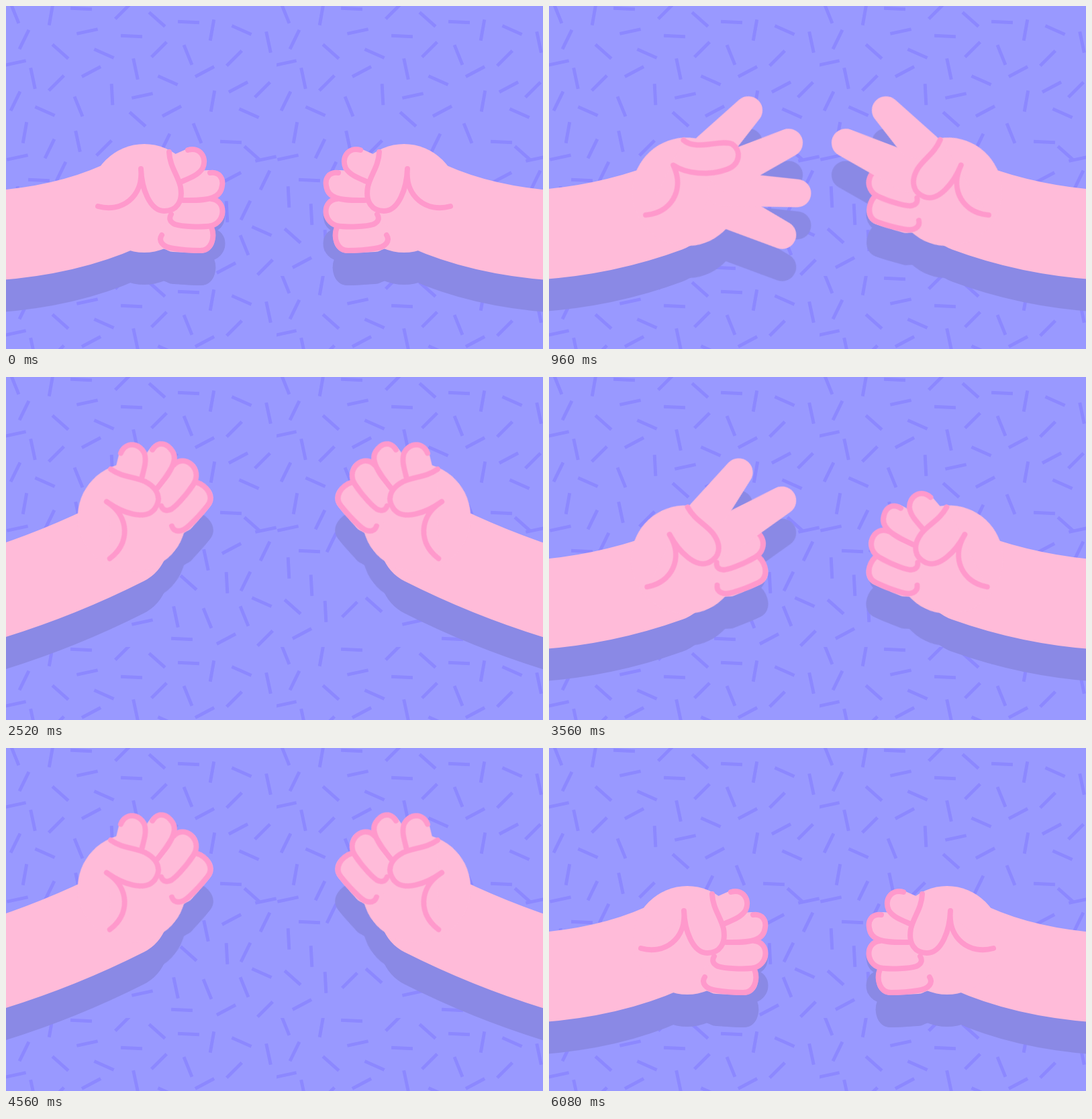
Write an HTML page without scripts that moves like this. It is 800 px wide and 512 px high and loops after 6.12 s.

```html
<!DOCTYPE html>
<html lang="en">
<head>
<meta charset="utf-8">
<title>Rock, paper, scissors</title>
<style>
html, body { margin: 0; width: 100%; height: 100%; overflow: hidden; background: #99f; }
svg { display: block; width: 100vw; height: 100vh; }
marker path { stroke: #8c88ff; stroke-width: 5; }

.hands { filter: drop-shadow(0 48px 0 #8a89e5); }
.right { --late: -2040ms; }
.arm, .skin, .line, .thumb { stroke-linecap: round; stroke-linejoin: round; }
.arm { fill: none; stroke: #ffbbd9; stroke-width: 134; animation: arm 2040ms infinite; }
.hand { transform-origin: 170px 299px; animation: swing 2040ms infinite; }
.palm, .skin, .thumb { fill: #ffbbd9; }
.skin { stroke: #ffbbd9; stroke-width: 42; }
.line, .thumb { stroke: #f9c; stroke-width: 8; }
.line { fill: none; }

.skin, .line, .thumb {
  d: var(--shut);
  animation: var(--open-in) 6120ms linear var(--late, 0s) infinite;
}
.line {
  animation: var(--open-in) 6120ms linear var(--late, 0s) infinite,
    var(--hide-in) 6120ms step-end var(--late, 0s) infinite;
}
/* index and middle open for paper and scissors, the rest for paper only */
.index, .middle { --open-in: open-two; --hide-in: hide-two; }
.ring, .pinky, .thumb { --open-in: open-one; --hide-in: hide-one; }

.skin.index {
  --shut: path("M250 245L277 233L262 250");
  --open: path("M257 235L334 204L280 238");
}
.line.index {
  --shut: path("M271 215C289 210 300 226 293 242C287 252 274 257 262 262");
  --open: path("M336 188C352 190 358 212 346 222C325 236 300 240 285 226");
}
.skin.middle {
  --shut: path("M262 268L304 266L262 268");
  --open: path("M263 272L374 270L270 288");
}
.line.middle {
  --shut: path("M304 249C318 247 324 258 322 268C320 286 305 291 264 290");
  --open: path("M374 253C392 254 396 275 384 284C360 294 326 292 325 262");
}
.skin.ring {
  --shut: path("M262 308L305 308L262 308");
  --open: path("M255 305L360 345L268 300");
}
.line.ring {
  --shut: path("M306 288C328 290 328 322 306 328C290 331 262 329 252 326C243 322 243 316 246 311");
  --open: path("M365 328C384 336 384 362 362 365C340 364 320 360 308 352C296 346 300 336 306 332");
}
.skin.pinky {
  --shut: path("M245 344L290 348L250 346");
  --open: path("M240 330L318 396L262 328");
}
.line.pinky {
  --shut: path("M306 330C312 346 306 366 288 365C275 365 262 364 250 362C232 360 227 350 232 342");
  --open: path("M330 384C340 396 334 415 316 414C300 412 285 400 278 390C268 378 270 368 276 364");
}
.thumb {
  --shut: path("M137 299C172 309 205 285 201 243C202 272 214 306 236 306C254 306 264 292 260 270C256 252 244 240 243 218");
  --open: path("M137 299C172 309 205 285 201 243C215 262 245 276 274 276C296 276 304 256 294 243C280 230 240 235 228 213");
}

@keyframes arm {
  0%, 94.5%, 100% { d: path("M-20 343Q90 335 170 299"); animation-timing-function: ease-in-out; }
  19.6%, 23.5% { d: path("M-20 324Q80 293 175 245"); animation-timing-function: ease-in; }
  31.4% { d: path("M-20 331Q68 316 177 267"); animation-timing-function: cubic-bezier(.2, .25, .6, 1); }
  39.2% { d: path("M-20 348Q90 342 172 307"); animation-timing-function: ease-in-out; }
  51%, 76.5% { d: path("M-20 340Q81 333 176 299"); animation-timing-function: ease-in-out; }
}
@keyframes swing {
  0%, 94.5%, 100% { transform: none; animation-timing-function: ease-in-out; }
  19.6%, 23.5% { transform: translate(5px, -54px) rotate(-52deg); animation-timing-function: ease-in; }
  31.4% { transform: translate(7px, -32px) rotate(-37.6deg); animation-timing-function: cubic-bezier(.2, .25, .6, 1); }
  39.2% { transform: translate(2px, 8px) rotate(0deg); animation-timing-function: ease-in-out; }
  51%, 76.5% { transform: translate(6px, 0) rotate(-25.7deg); animation-timing-function: ease-in-out; }
}
@keyframes open-one {
  0%, 11.4%, 30.1%, 100% { d: var(--shut); }
  13.4%, 26.8% { d: var(--open); }
}
@keyframes open-two {
  0%, 11.4%, 30.1%, 44.8%, 63.4%, 100% { d: var(--shut); }
  13.4%, 26.8%, 46.7%, 60.1% { d: var(--open); }
}
@keyframes hide-one {
  0%, 27.4%, 100% { opacity: 1; }
  13%, 26.8% { opacity: 0; }
}
@keyframes hide-two {
  0%, 27.4%, 60.8%, 100% { opacity: 1; }
  13%, 46.4% { opacity: 0; }
}

.a { marker: url(#a); } .b { marker: url(#b); } .c { marker: url(#c); }
.d { marker: url(#d); } .e { marker: url(#e); } .f { marker: url(#f); }
.g { marker: url(#g); } .h { marker: url(#h); } .i { marker: url(#i); }
.j { marker: url(#j); } .k { marker: url(#k); }
pattern path { fill: none; }
marker { overflow: visible; }
</style>
</head>
<body>
<svg viewBox="0 0 800 512" preserveAspectRatio="none">
  <defs>
    <!-- one confetti bar per angle -->
    <marker id="a" orient="3" markerUnits="userSpaceOnUse"><path d="M-16 0h32"/></marker>
    <marker id="b" orient="-12" markerUnits="userSpaceOnUse"><path d="M-16 0h32"/></marker>
    <marker id="c" orient="24" markerUnits="userSpaceOnUse"><path d="M-16 0h32"/></marker>
    <marker id="d" orient="-28" markerUnits="userSpaceOnUse"><path d="M-16 0h32"/></marker>
    <marker id="e" orient="42" markerUnits="userSpaceOnUse"><path d="M-16 0h32"/></marker>
    <marker id="f" orient="-45" markerUnits="userSpaceOnUse"><path d="M-16 0h32"/></marker>
    <marker id="g" orient="68" markerUnits="userSpaceOnUse"><path d="M-16 0h32"/></marker>
    <marker id="h" orient="-64" markerUnits="userSpaceOnUse"><path d="M-16 0h32"/></marker>
    <marker id="i" orient="78" markerUnits="userSpaceOnUse"><path d="M-16 0h32"/></marker>
    <marker id="j" orient="-80" markerUnits="userSpaceOnUse"><path d="M-16 0h32"/></marker>
    <marker id="k" orient="87" markerUnits="userSpaceOnUse"><path d="M-16 0h32"/></marker>
    <pattern id="confetti" width="403" height="403" patternUnits="userSpaceOnUse">
      <path class="a" d="M112 4L187 45L272 24L335 203L49 260L262 391"/>
      <path class="b" d="M14 85L121 38L17 226L387 228L203 134L203 366"/>
      <path class="c" d="M146 71L241 111L58 157L362 160L351 36L381 336"/>
      <path class="d" d="M127 98L296 98L346 121L247 157L336 256L328 391L38 383"/>
      <path class="e" d="M225 20L81 68L196 169L367 220L272 307L24 343L145 340"/>
      <path class="f" d="M174 8L228 65L75 115L340 78L382 125L146 212L109 347L386 390"/>
      <path class="g" d="M13 11L271 73L108 150L285 190L300 360L355 357"/>
      <path class="h" d="M27 50L14 142L65 213L237 205L386 260L82 247L357 305"/>
      <path class="i" d="M391 54L40 108L193 94L107 202L253 358L298 273"/>
      <path class="j" d="M67 13L307 36L308 142L28 189"/>
      <path class="k" d="M158 132L18 285L52 311L73 350L329 307"/>
    </pattern>
  </defs>
  <rect width="800" height="512" fill="#99f"/>
  <rect width="800" height="512" fill="url(#confetti)"/>

  <g class="hands">
    <g class="left">
      <path class="arm"/>
      <g class="hand">
        <circle class="palm" cx="206" cy="287" r="81"/>
        <path class="skin pinky"/><path class="line pinky"/>
        <path class="skin ring"/><path class="line ring"/>
        <path class="skin middle"/><path class="line middle"/>
        <path class="skin index"/><path class="line index"/>
        <path class="thumb"/>
      </g>
    </g>
    <g class="right" transform="translate(799) scale(-1 1)">
      <path class="arm"/>
      <g class="hand">
        <circle class="palm" cx="206" cy="287" r="81"/>
        <path class="skin pinky"/><path class="line pinky"/>
        <path class="skin ring"/><path class="line ring"/>
        <path class="skin middle"/><path class="line middle"/>
        <path class="skin index"/><path class="line index"/>
        <path class="thumb"/>
      </g>
    </g>
  </g>
</svg>
</body>
</html>
```
